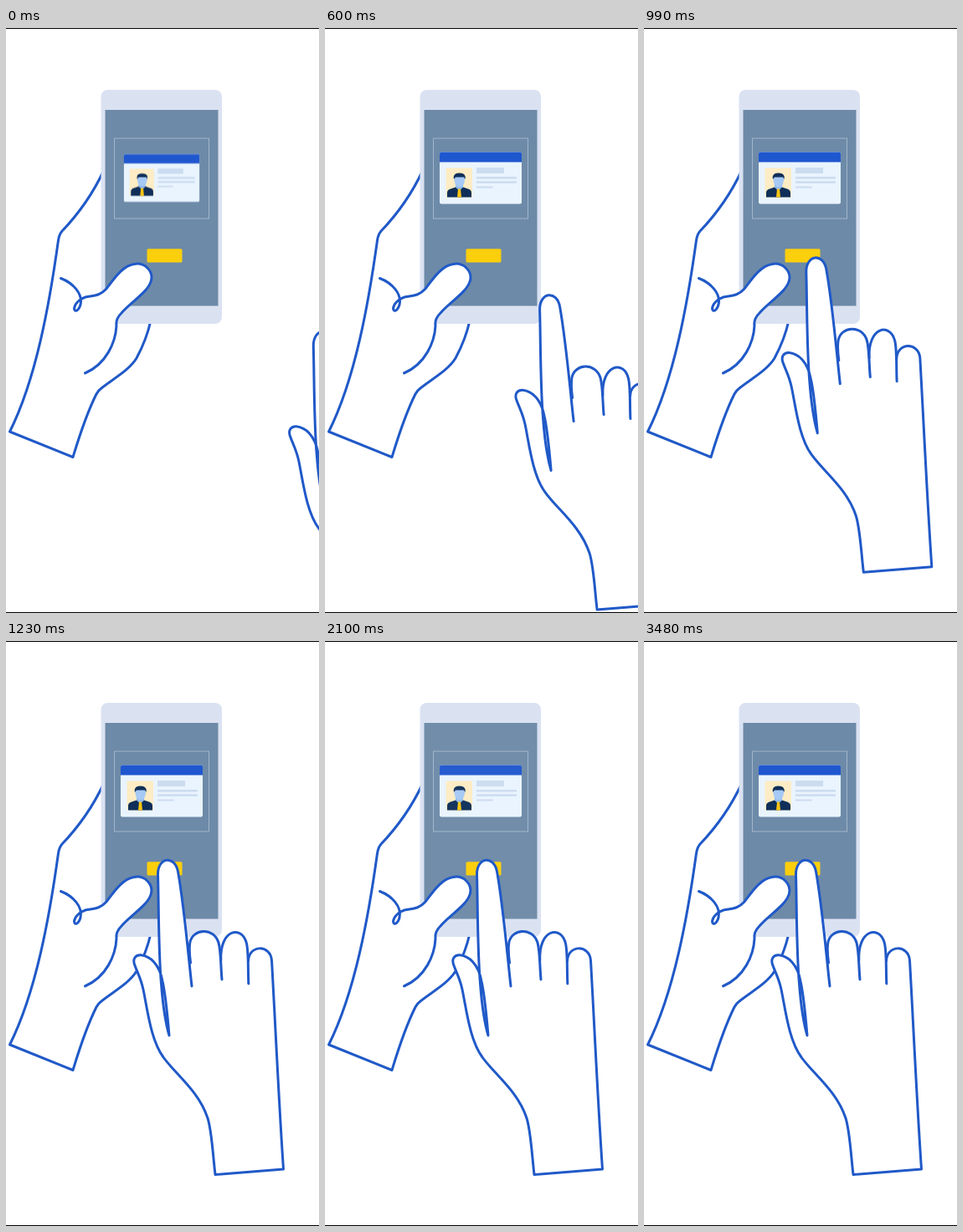
These frames come from a looping animation (374x700 px, 3510 ms). An HTML page:

```html
<!DOCTYPE html>
<html lang="en">
<head>
<meta charset="utf-8">
<title>Scan the card</title>
<style>
  html, body { margin: 0; width: 100%; height: 100%; overflow: hidden; background: #fff; }
  svg { display: block; width: 100%; height: 100%; }

  .line {
    fill: none;
    stroke: #2059c8;
    stroke-width: 3;
    stroke-linecap: round;
    stroke-linejoin: round;
  }
  .skin { fill: #fff; }

  .card, .flash, .tapper { animation: 3510ms linear infinite; }

  .card {
    transform-origin: 186px 179.5px;
    animation-name: grow;
  }
  @keyframes grow {
    0% { transform: scale(.92); animation-timing-function: ease-out; }
    8.5%, 100% { transform: scale(1); }
  }

  .flash { opacity: 0; animation-name: flash; }
  @keyframes flash {
    0%, 48% { opacity: 0; }
    51.7% { opacity: .18; }
    55.6% { opacity: .1; }
    61.5%, 100% { opacity: 0; }
  }

  /* Constant speed along a shallow arc, then rest on the button */
  .tapper {
    offset-path: path("M186 101 C118.5 81 48 53.5 0 0");
    offset-rotate: 0deg;
    transform-origin: 0 0;
    animation-name: reach;
  }
  @keyframes reach {
    0% { offset-distance: 0%; }
    30.77%, 100% { offset-distance: 100%; }
  }
</style>
</head>
<body>
<svg viewBox="0 0 374 700" preserveAspectRatio="none">
  <!-- holding hand, behind the phone -->
  <path class="line skin" d="M117 170 C104 198 88 221 67 243 Q63.500 247 62.500 254 C52 330 36 420 4.500 483
    L80 513.500 C88 487 97 460 108 438 Q110 434 114 431 C126 421 147 410 156 395 C163 382 169 368 173 350"/>

  <!-- phone -->
  <rect x="113.500" y="74" width="144.500" height="280" rx="8" fill="#dae2f2"/>
  <rect x="118.500" y="98" width="135" height="234.500" fill="#6d8aa8"/>
  <rect x="129.500" y="132" width="113" height="96" fill="none" stroke="#a3b6ca"/>

  <g class="card">
    <rect x="137" y="148.500" width="98" height="62" rx="2" fill="#e9f4fe"/>
    <path d="M137 160.500 V150.500 Q137 148.500 139 148.500 H233 Q235 148.500 235 150.500 V160.500 Z" fill="#1f57cf"/>
    <rect x="144.500" y="167.500" width="31.500" height="35" fill="#fdecc4"/>
    <path d="M146 202.500 V197 Q146 193.500 150 192.500 L156 190.500 H165 L171 192.500 Q175 193.500 175 197 V202.500 Z" fill="#0f2f59"/>
    <path d="M156 190.500 L160.500 195 L165 190.500 V186 H156 Z" fill="#8fb8ee"/>
    <path d="M159 192.500 H162 L163 202.500 H158 Z" fill="#fcc613"/>
    <path d="M154.500 178 H167 V182 Q166 190.500 160.700 190.500 Q155.500 190.500 154.500 182 Z" fill="#a6c9f6"/>
    <path d="M154 181 Q152.500 173.500 160 173.500 Q169 173 167.500 181 L166 178.500 H156 Z" fill="#0f2f59"/>
    <g fill="#ccdcf0">
      <rect x="181" y="167" width="33" height="7"/>
      <rect x="181" y="178" width="48" height="2.500"/>
      <rect x="181" y="183.300" width="48" height="2.500"/>
      <rect x="181" y="189.500" width="19.500" height="2"/>
    </g>
  </g>

  <rect class="flash" x="118.500" y="98" width="135" height="234.500" fill="#fff"/>
  <rect x="168.500" y="264.300" width="42" height="16.200" rx="1.500" fill="#fccf0c"/>

  <!-- holding thumb, in front of the phone -->
  <path class="line skin" d="M65.500 299.500 C80 305 92 318 89 331 C87 338 82 341 81.500 335.500 C82 330 88 324 95 322
    C104 320 112 321 120 312 C128 302 138 285 153 282.500 C166 280 176 291 173.500 302
    C170 316 150 327 138 341 C133 346 131 350 132 356 C131 376 120 402 94.500 413"/>

  <!-- tapping hand -->
  <g class="tapper">
    <path class="skin" d="M195 472 L184 400 C178 376 166 375 160 376 Q151 378 153.500 388 L184 492 L245 580 L250 638.500 L331.500 632
      L317.500 381 C316 364 291 364 289 380 L288 365 C284 344 259 344 256 369 L254 362 C248 343 220 344 219.500 366
      L205.500 276 C202 256 181 258 181.500 280 L184 370 Z"/>
    <g class="line">
      <path d="M222 413 C218 378 213 318 205.500 276 C202 256 181 258 181.500 280 C182.500 310 182 370 185.500 410 C187 430 190 455 195 472
        C193 448 191 425 187 407 C183 386 172 377 161 375.800 C154 375.500 151.500 381 153.500 387
        C157 397 161 403 164 417 C169 441 173 478 188 498 C203 519 230 538 241 571 C246 587 247 613 250 638.500
        L331.500 632 C326 552 322 462 317.500 382 C316 363 290 363 289.500 383"/>
      <path d="M220.500 385 C219 374 219 366 219.800 361 C223 344 248 342 254 361 C257 372 256.500 390 258 405"/>
      <path d="M256.800 382 C255 345 282 339 287.500 362 C290 373 289 392 289.800 410"/>
    </g>
  </g>

  <path d="M0 .5 H374 M0 699.500 H374" stroke="#000"/>
</svg>
</body>
</html>
```
